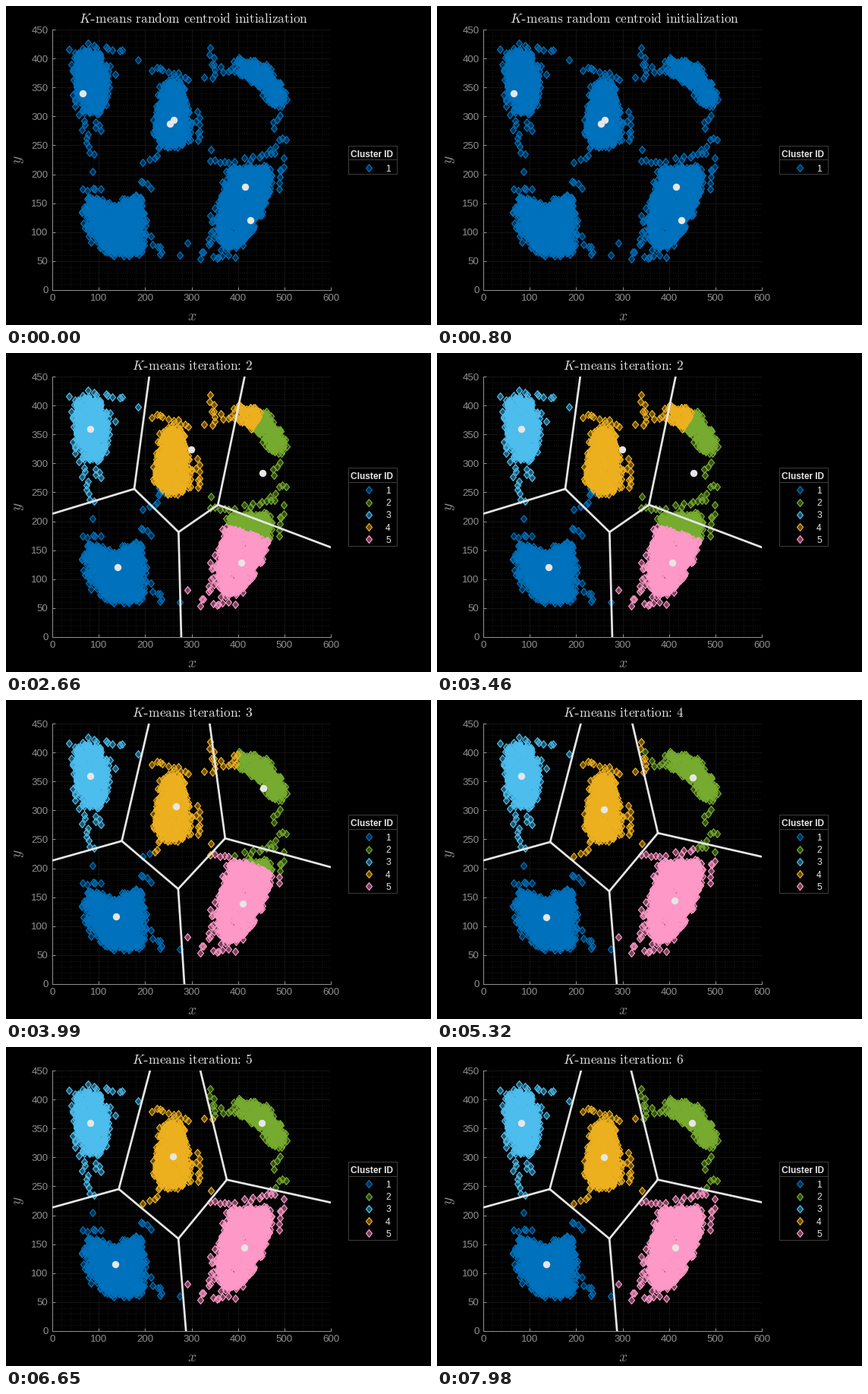
Animation, 560 px wide and 420 px high, one loop 9.31 s. Source, as a matplotlib script:

```python
import numpy as np
import matplotlib.pyplot as plt
from matplotlib.animation import FuncAnimation
from matplotlib.markers import MarkerStyle
from matplotlib.patches import Rectangle
from matplotlib.path import Path

plt.rcParams["font.family"] = "Liberation Sans"
plt.rcParams["mathtext.fontset"] = "cm"

W, H, DPI = 560, 420, 100
PX = 72 / DPI  # points per pixel
LEFT, RIGHT, TOP, BOTTOM = 61, 428, 31, 374
XMAX, YMAX = 600, 450
COLORS = ["#0072bd", "#77ac30", "#4dbeee", "#edb120", "#ff99c8"]
LIGHT, GREY = "#e6e6e6", "#909090"
LEGEND_MID = 202.6
STEPS = 7

# Centroids of clusters 1..5: first moves, then they settle at REST
MOVES = np.array([
    [(254, 287), (416, 178), (66, 340), (261, 294), (427.5, 121)],
    [(175, 155), (440.5, 245), (84, 308), (316, 340), (404.5, 113.5)],
    [(140.6, 120.7), (453.6, 283.4), (82.5, 359.5), (299, 323.5), (407, 129.2)],
    [(137.3, 116.8), (454.5, 338), (82.5, 359.5), (266.5, 306.4), (411, 139)],
])
REST = np.array([(136.5, 116), (450.3, 359.2), (82.5, 359.5), (259.8, 301), (412.9, 144.5)])
LAST_GAP = np.array([(0, 0), (1.2, -1.7), (0, 0), (0.9, 1), (-0.4, -0.7)])

# Outlines of the dense areas, in pixels
DENSE = [
    [(93, 62), (108, 56), (122, 60), (132, 90), (132, 126), (125, 140), (105, 139), (89, 102)],
    [(204, 104), (218, 98), (232, 104), (242, 160), (234, 182), (204, 187), (196, 166)],
    [(302, 71), (322, 70), (346, 81), (367, 114), (364, 134), (353, 131), (333, 106), (306, 86)],
    [(106, 252), (140, 263), (179, 250), (182, 310), (172, 327), (134, 325), (108, 294)],
    [(295, 214), (344, 209), (350, 232), (335, 278), (309, 312), (291, 321), (277, 312), (284, 250)],
]

# Thin trails of points around them: x0, y0, x1, y1
TRAILS = [
    (104, 152, 111, 198), (106, 51, 151, 60), (136, 74, 143, 90),
    (85, 117, 98, 142), (117, 152, 124, 164),
    (192, 80, 242, 97), (253, 140, 254, 178), (185, 206, 200, 189),
    (270, 66, 273, 96), (276, 79, 302, 88), (367, 171, 350, 186), (357, 142, 353, 160),
    (99, 243, 122, 240), (180, 228, 191, 241), (192, 306, 204, 328), (100, 272, 110, 312),
    (256, 330, 270, 308), (272, 204, 302, 207), (314, 200, 353, 192),
    (364, 203, 358, 238), (271, 331, 300, 328), (271, 298, 278, 256),
]
SINGLES = [(82.5, 56.5), (173.5, 70.5), (269, 55), (260.5, 94), (114, 218),
           (270, 189), (228.5, 328), (238.5, 312)]


def centroids(step):
    if step < len(MOVES):
        return MOVES[step]
    return REST + LAST_GAP * 0.2 ** (step - len(MOVES))


def to_data(px):
    x = (px[:, 0] - LEFT) / (RIGHT - LEFT) * XMAX
    y = (BOTTOM - px[:, 1]) / (BOTTOM - TOP) * YMAX
    return np.column_stack([x, y])


def fill_outline(rng, outline, density=0.17, spread=2.6):
    """Random points inside an outline with a slightly frayed rim."""
    low, high = np.min(outline, axis=0), np.max(outline, axis=0)
    pts = rng.uniform(low, high, (int(density * np.prod(high - low)), 2))
    pts = pts[Path(outline).contains_points(pts)]
    return pts + rng.normal(0, spread, pts.shape)


def trail(rng, x0, y0, x1, y1, spacing=5.5, spread=2.2):
    count = 1 + round(np.hypot(x1 - x0, y1 - y0) / spacing)
    pts = np.linspace((x0, y0), (x1, y1), count)
    return pts + rng.normal(0, spread, pts.shape)


def make_points():
    rng = np.random.default_rng(4)
    parts = [fill_outline(rng, outline) for outline in DENSE]
    parts += [trail(rng, *ends) for ends in TRAILS]
    return to_data(np.vstack(parts + [SINGLES]))


def nearest(points, centers):
    gaps = points[:, None, :] - centers[None, :, :]
    return (gaps ** 2).sum(axis=2).argmin(axis=1)


def circumcenter(a, b, c):
    m = 2 * np.array([b - a, c - a])
    return np.linalg.solve(m, [b @ b - a @ a, c @ c - a @ a])


def ray(start, a, b, outward):
    """Far point on the bisector of a and b, leaving in the outward direction."""
    d = np.array([a[1] - b[1], b[0] - a[0]])
    d = d / np.hypot(*d)
    return start + 2000 * d * np.sign(d @ np.array(outward))


def borders(centers):
    c1, c2, c3, c4, c5 = centers
    p = circumcenter(c1, c3, c4)
    q = circumcenter(c1, c4, c5)
    r = circumcenter(c2, c4, c5)
    gap = np.full(2, np.nan)
    return np.array([
        ray(p, c1, c3, (-1, 0)), p, q, r, ray(r, c2, c5, (1, 0)), gap,
        p, ray(p, c3, c4, (0, 1)), gap,
        r, ray(r, c2, c4, (0, 1)), gap,
        q, ray(q, c1, c5, (0, -1)),
    ])


def title_text(words):
    body = r"\hspace{0.38}".join(r"\text{%s}" % w for w in words.split())
    return r"$K\hspace{0.46}" + body + "$"


fig = plt.figure(figsize=(W / DPI, H / DPI), dpi=DPI, facecolor="black")
ax = fig.add_axes([LEFT / W, 1 - BOTTOM / H, (RIGHT - LEFT) / W, (BOTTOM - TOP) / H],
                  facecolor="black")
ax.set(xlim=(0, XMAX), ylim=(0, YMAX))
ax.set_xticks(range(0, XMAX + 1, 100))
ax.set_yticks(range(0, YMAX + 1, 50))
ax.set_xticks(range(0, XMAX + 1, 20), minor=True)
ax.set_yticks(range(0, YMAX + 1, 10), minor=True)
ax.set_axisbelow(True)
ax.grid(which="major", color="#1c1c1c", lw=0.7 * PX)
ax.grid(which="minor", color="#262626", lw=0.7 * PX, ls=(0, (1.4, 3)))
ax.tick_params(which="major", direction="in", length=4 * PX, width=PX, pad=5.5 * PX,
               color=GREY, labelcolor=GREY, labelsize=13.3 * PX)
ax.tick_params(which="minor", length=0)
for side in ("top", "right"):
    ax.spines[side].set_visible(False)
for side in ("left", "bottom"):
    ax.spines[side].set(color=GREY, linewidth=PX)

# Overlay in pixel units for title, labels and legend
over = fig.add_axes([0, 0, 1, 1])
over.set(xlim=(0, W), ylim=(H, 0))
over.axis("off")

diamond = MarkerStyle(Path([(0, 1), (0.82, 0), (0, -1), (-0.82, 0), (0, 1)], closed=True),
                      joinstyle="miter")


def diamonds(axes, color, **kw):
    return axes.plot([], [], ls="", marker=diamond, ms=9.8 * PX, mec=color,
                     mfc=(color, 0.45), mew=1.2 * PX, **kw)[0]


groups = [diamonds(ax, c, zorder=3 + 0.1 * i) for i, c in enumerate(COLORS)]
border_line, = ax.plot([], [], color=LIGHT, lw=2.7 * PX, zorder=5)
center_dots, = ax.plot([], [], "o", color=LIGHT, ms=9.4 * PX, mew=0, zorder=6)

title = over.text(0, 22, "", color=LIGHT, size=17.3 * PX, va="baseline")
hyphen, = over.plot([], [], color=LIGHT, lw=1.1 * PX, solid_capstyle="butt")
over.text(245, 409, "$x$", color=GREY, size=19.5 * PX, ha="center", va="center")
over.text(18, 202, "$y$", color=GREY, size=19.5 * PX, ha="center", va="center",
          rotation=90)

frame_box = over.add_patch(Rectangle((450.5, 0), 64, 1, fc="black", ec="#3c3c3c", lw=PX))
rule, = over.plot([], [], color="#3c3c3c", lw=PX)
heading = over.text(482, 0, "Cluster ID", color=LIGHT, size=11.9 * PX, weight="bold",
                    ha="center", va="center_baseline")
keys = [diamonds(over, c) for c in COLORS]
key_labels = [over.text(503.5, 0, str(i + 1), color=LIGHT, size=12 * PX,
                        ha="center", va="center_baseline") for i in range(5)]

points = make_points()


def layout_legend(count):
    height = 21 + 16.4 * count
    top = LEGEND_MID - height / 2
    frame_box.set_y(top)
    frame_box.set_height(height)
    rule.set_data([450.5, 514.5], [top + 18.5] * 2)
    heading.set_y(top + 10.2)
    for i, (key, label) in enumerate(zip(keys, key_labels)):
        y = top + 29.3 + 16.2 * i
        key.set_data([477.5], [y])
        label.set_y(y)
        key.set_visible(i < count)
        label.set_visible(i < count)


def update(step):
    if step == 0:
        ids = np.zeros(len(points), int)
        left, words = 96, "means random centroid initialization"
        border_line.set_data([], [])
    else:
        ids = nearest(points, centroids(step - 1))
        left, words = 166, f"means iteration: {step}"
        border_line.set_data(*borders(centroids(step)).T)
    for i, group in enumerate(groups):
        group.set_data(*points[ids == i].T)
    center_dots.set_data(*centroids(step).T)
    title.set_x(left)
    title.set_text(title_text(words))
    hyphen.set_data([left + 15.2, left + 19.9], [18.2, 18.2])
    layout_legend(1 if step == 0 else 5)
    return []


anim = FuncAnimation(fig, update, frames=STEPS, interval=1330, repeat=True,
                     repeat_delay=0, blit=False)
plt.show()
```
